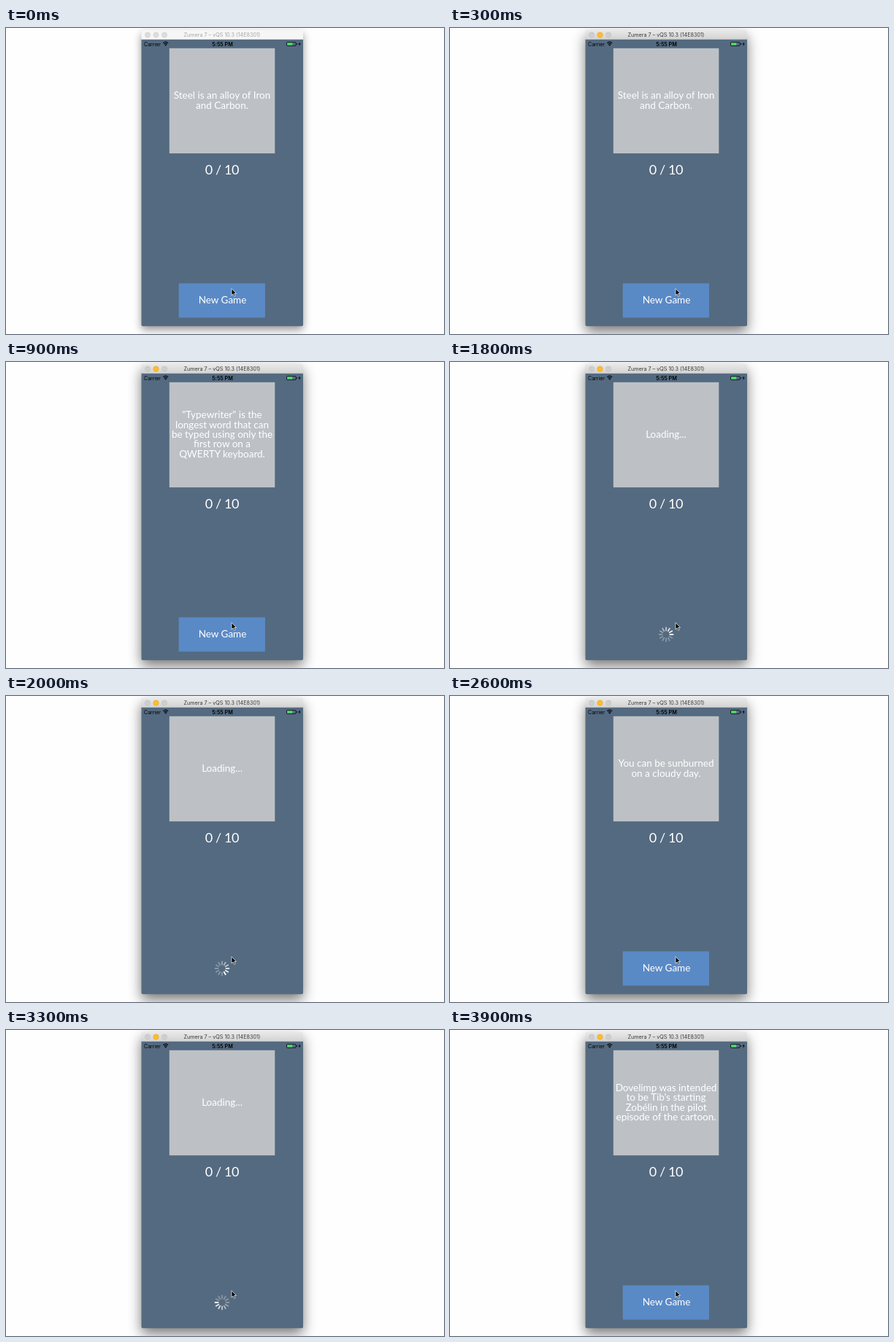
An HTML page that plays this animation: 600x420 px, repeating every 4000 ms.

```html
<!DOCTYPE html>
<html lang="en">
<head>
<meta charset="utf-8">
<title>Trivia cards</title>
<style>
  html, body { margin: 0; width: 100%; height: 100%; overflow: hidden; background: #fefefe; }
  svg { display: block; width: 600px; height: 420px; }
  text { text-anchor: middle; }
  .app { font: 13.5px Lato, "Open Sans", sans-serif; fill: #fff; }
  .score { font-size: 18px; letter-spacing: -.4px; }
  .ui { font: 7.2px Inter, Roboto, sans-serif; }
</style>
</head>
<body>
<svg viewBox="0 0 600 420">
  <defs>
    <linearGradient id="barFill" x2="0" y2="1">
      <stop offset="0" stop-color="#e9e9e9"/>
      <stop offset="1" stop-color="#d2d2d2"/>
    </linearGradient>
    <filter id="soft" x="-30%" y="-30%" width="160%" height="160%">
      <feGaussianBlur stdDeviation="6"/>
    </filter>
    <filter id="deep" x="-30%" y="-30%" width="160%" height="160%">
      <feGaussianBlur stdDeviation="9"/>
    </filter>
  </defs>

  <rect id="shadow" x="185.5" width="221.5" height="406" rx="3"/>
  <path id="bar" d="M185.5 16V6q0-3.5 3.5-3.5h214.500q3.500 0 3.500 3.500v10z"/>
  <path d="M185.500 15.700h221.500v391.500q0 2-2 2h-217.500q-2 0-2-2z" fill="#546a80"/>
  <g id="lights" stroke-width=".5">
    <circle cx="194" cy="9.500" r="3.700"/>
    <circle cx="205.500" cy="9.500" r="3.700"/>
    <circle cx="217" cy="9.500" r="3.700"/>
  </g>
  <text id="title" class="ui" x="296" y="12.300">Zumera 7 – vQS 10.3 (14E8301)</text>

  <g class="ui">
    <text x="200.500" y="24.600" style="font-size:7px">Carrier</text>
    <text x="296.500" y="24.600" font-weight="600">5:55 PM</text>
  </g>
  <g fill="none" stroke="#000" stroke-width="1.100">
    <path d="M215.200 20.600q3.500-2.900 7 0M216.600 22.200q2.100-1.700 4.200 0"/>
    <rect x="384.500" y="19.500" width="12.500" height="5" rx=".8" stroke-width=".7"/>
  </g>
  <path d="M217.400 23.200q1.300-1 2.600 0l-1.300 1.500z"/>
  <rect x="385.200" y="20.200" width="7" height="3.600" fill="#4cd964"/>
  <path d="M397.800 21h.9v2h-.9zM402.700 19.300l-2.300 3h1.600l-.6 2.600 2.400-3.300h-1.600z"/>

  <rect x="223.800" y="27.800" width="144.500" height="144.300" fill="#bdc1c6"/>
  <g id="card" class="app"></g>
  <text class="app score" x="296" y="200.500">0 / 10</text>

  <g id="button">
    <rect x="236.700" y="350.500" width="118.200" height="47" fill="#5a8ac6"/>
    <text class="app" x="296.500" y="378.300">New Game</text>
  </g>
  <g id="spinner" transform="translate(296 374)" stroke="#fff" stroke-width="1.800" stroke-linecap="round"></g>
  <path d="M309 357.700v9.300l2.100-1.900 1.500 3.300 1.500-.7-1.500-3.200h2.900z" stroke="#fff" stroke-width=".7"/>
</svg>

<script>
const LOOP = 4000, STEP = 100, FOCUS = 300, SPOKES = 12;
const LOADING = ['Loading...'];

// Each scene holds until the next one starts.
const scenes = [
  [0, ['Steel is an alloy of Iron', 'and Carbon.']],
  [400, LOADING],
  [800, ['"Typewriter" is the', 'longest word that can', 'be typed using only the',
         'first row on a', 'QWERTY keyboard.']],
  [1800, LOADING],
  [2300, ['You can be sunburned', 'on a cloudy day.']],
  [3000, LOADING],
  [3500, ['Dovelimp was intended', "to be Tib's starting", 'Zobélin in the pilot',
          'episode of the cartoon.']]
];

const el = id => document.getElementById(id);
const set = (node, attrs) => {
  for (const key in attrs) node.setAttribute(key, attrs[key]);
  return node;
};
const add = (parent, tag, attrs) =>
  parent.appendChild(set(document.createElementNS('http://www.w3.org/2000/svg', tag), attrs));

const spokes = Array.from({ length: SPOKES }, (_, i) =>
  add(el('spinner'), 'line', { y1: -5.4, y2: -9.5, transform: `rotate(${i * 360 / SPOKES})` }));

let shown;
function showCard(lines) {
  if (shown === lines) return;
  shown = lines;
  el('card').replaceChildren();
  lines.forEach((line, i) => {
    const y = 104 + (i - (lines.length - 1) / 2) * 13.3;
    add(el('card'), 'text', { x: 296, y }).textContent = line;
  });
}

function showWindow(active) {
  set(el('shadow'), active
    ? { y: 11, opacity: .52, filter: 'url(#deep)' }
    : { y: 8, opacity: .42, filter: 'url(#soft)' });
  set(el('bar'), { fill: active ? 'url(#barFill)' : '#f6f6f6' });
  set(el('title'), { fill: active ? '#3a3a3a' : '#a6a6a6' });
  [...el('lights').children].forEach((light, i) => {
    const amber = active && i === 1;
    set(light, {
      fill: amber ? '#fdbc2e' : active ? '#cecece' : '#dcdcdc',
      stroke: amber ? '#dfa023' : active ? '#bcbcbc' : '#d0d0d0'
    });
  });
}

function spin(t) {
  const head = Math.floor(t / 1000 * SPOKES + 5.6);
  spokes.forEach((spoke, i) => {
    const age = ((head - i) % SPOKES + SPOKES) % SPOKES;
    set(spoke, { opacity: Math.max(.3, 1 - age * .12) });
  });
}

function draw(time) {
  const t = Math.floor(time % LOOP / STEP) * STEP;
  const lines = scenes.filter(([start]) => start <= t).pop()[1];
  const busy = lines === LOADING;
  showWindow(t >= FOCUS);
  showCard(lines);
  set(el('button'), { visibility: busy ? 'hidden' : 'visible' });
  set(el('spinner'), { visibility: busy ? 'visible' : 'hidden' });
  spin(t);
}

const start = performance.now();
function tick() {
  draw(performance.now() - start);
  requestAnimationFrame(tick);
}
tick();
</script>
</body>
</html>
```
